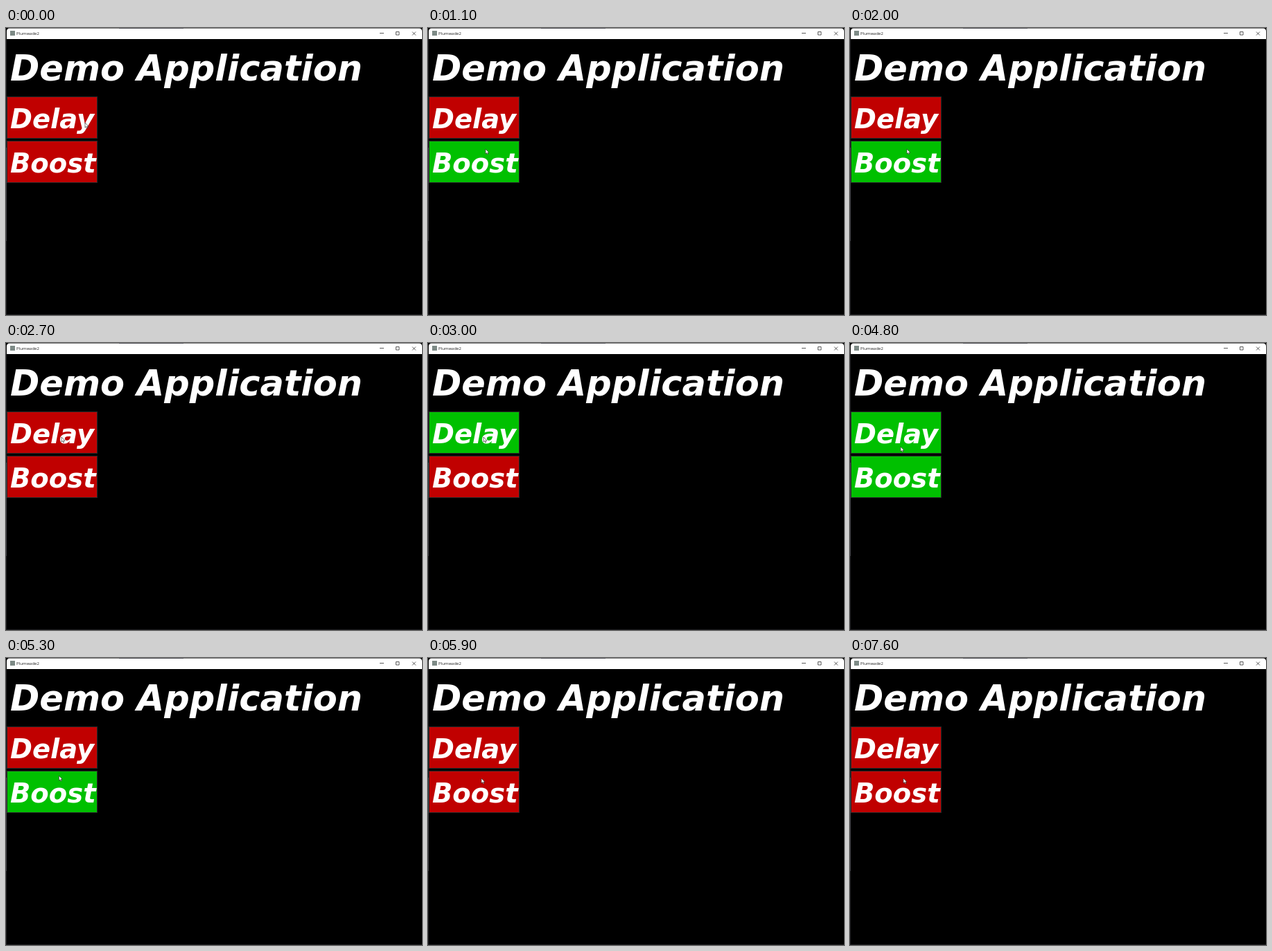
Recreate the animation shown at these times as an HTML page. Size 600x415 px, loop 7.7 s.

```html
<!DOCTYPE html>
<html lang="en">
<head>
<meta charset="utf-8">
<title>Demo Application</title>
<style>
  html, body { margin: 0; width: 100%; height: 100%; overflow: hidden; background: #000; }
  svg { display: block; width: 100vw; height: 100vh; }
  .label { font: italic 700 38.5px "DejaVu Sans", sans-serif; fill: #fff; }
  .heading { font-size: 51px; }
  .caption { font: 6px "Open Sans", sans-serif; fill: #222; }
  .controls { fill: none; stroke: #333; stroke-width: .8; }
  .button { width: 130px; height: 60px; stroke: #2a2a2a; }
</style>
</head>
<body>
<svg viewBox="0 0 600 415">
  <rect width="600" height="415"/>
  <path d="M.5 16V415M0 414.5H600" stroke="#1d1d20"/>
  <path d="M.5 173V308" stroke="#44444a"/>
  <path d="M1 16V5Q1 .5 5 .5H596Q600 .5 600 5V16Z" fill="#fff"/>
  <path d="M163 .5H256" stroke="#55555c"/>

  <rect x="6" y="4" width="7" height="7" fill="#7d8a86"/>
  <text class="caption" x="15" y="10">Plumwade2</text>
  <path class="controls" d="M539 7.5H545M562.5 5.5H567V10H562.5ZM586 5.5L591 10.5M591 5.5L586 10.5"/>

  <text class="label heading" x="6" y="75.5">Demo Application</text>
  <rect class="button" id="delay" x="1.5" y="99.5"/>
  <text class="label" x="6" y="145">Delay</text>
  <rect class="button" id="boost" x="1.5" y="163.5"/>
  <text class="label" x="6" y="208.5">Boost</text>

  <path id="cursor" d="M0 0V7L1.6 5.6L2.7 8L3.8 7.5L2.8 5.2H5Z" fill="#fff" stroke="#222" stroke-width=".6"/>
</svg>
<script>
  const LOOP = 7700, STEP = 100;
  const GLIDE = 400, PAUSE = 300; // travel time, then rest before the click
  const RED = "#c00000", GREEN = "#00c000";

  const origin = { x: 114, y: 137 };
  const clicks = [
    { time: 1100, button: "boost", x: 83, y: 175 },
    { time: 2100, button: "boost", x: 82, y: 175 },
    { time: 2900, button: "delay", x: 80, y: 136 },
    { time: 4000, button: "boost", x: 76, y: 184 },
    { time: 5100, button: "delay", x: 73, y: 150 },
    { time: 5700, button: "boost", x: 77, y: 174 }
  ];

  const find = id => document.getElementById(id);
  const clamp = u => Math.min(1, Math.max(0, u));
  const ease = u => u * u * (3 - 2 * u);

  function pointerAt(time) {
    let { x, y } = origin;
    for (const click of clicks) {
      const u = ease(clamp((time - click.time + PAUSE + GLIDE) / GLIDE));
      x += (click.x - x) * u;
      y += (click.y - y) * u;
    }
    return [x, y];
  }

  function colorAt(time, button) {
    const count = clicks.filter(c => c.button === button && c.time <= time).length;
    return count % 2 ? GREEN : RED;
  }

  function draw(now) {
    const time = Math.floor(now % LOOP / STEP) * STEP;
    for (const id of ["delay", "boost"]) find(id).setAttribute("fill", colorAt(time, id));
    find("cursor").setAttribute("transform", `translate(${pointerAt(time)})`);
  }

  const start = performance.now();
  function tick() {
    draw(performance.now() - start);
    requestAnimationFrame(tick);
  }
  tick();
</script>
</body>
</html>
```
